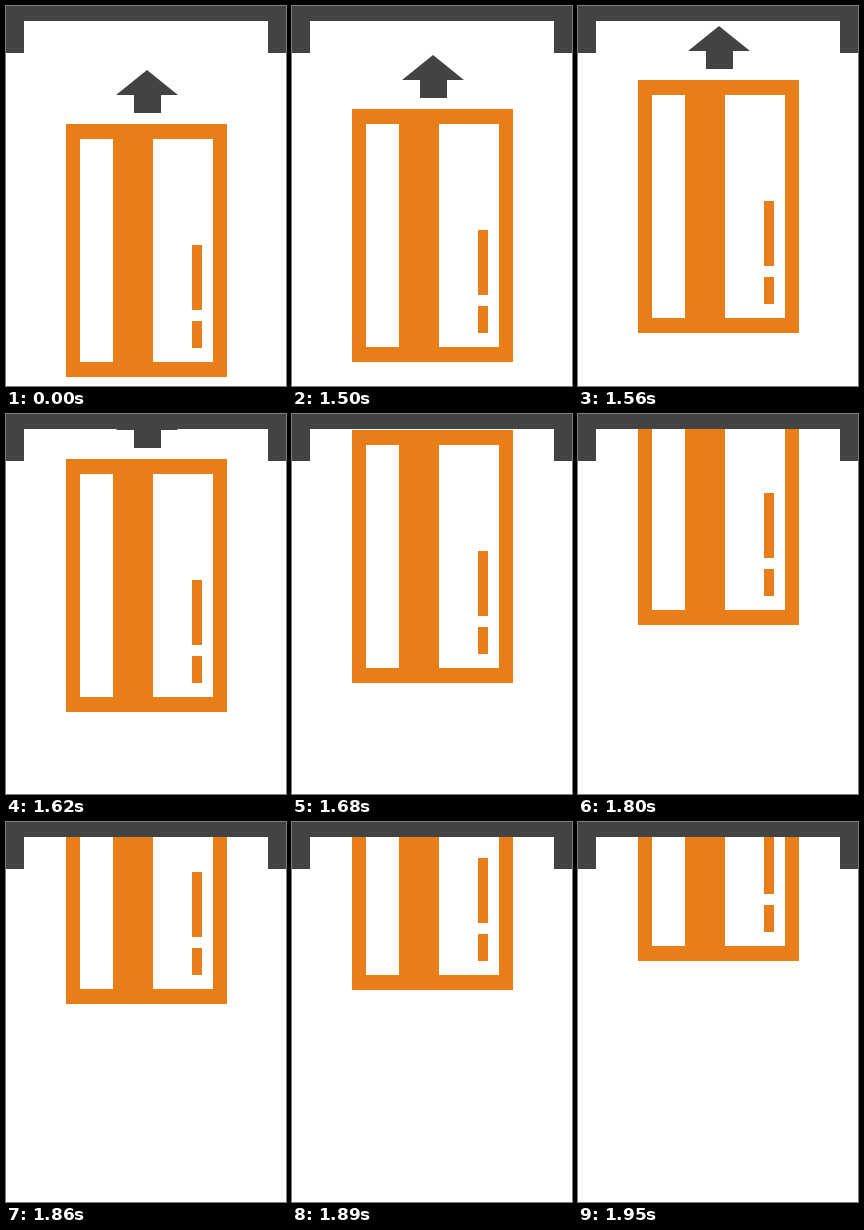
An HTML page for the animation above (3.45 s loop, 280 by 380 pixels).

```html
<!DOCTYPE html>
<html lang="en">
<head>
<meta charset="utf-8">
<title>Insert card</title>
<style>
  html, body { margin: 0; height: 100%; overflow: hidden; background: #fff; }
  svg { display: block; }
</style>
</head>
<body>
<svg width="280" height="380" viewBox="0 0 280 380">
  <g id="card">
    <path fill="#434343" d="M141 64L172 89H155V107H128V89H110Z"/>
    <path fill="#e87e1a" fill-rule="evenodd" d="M60 118H221V371H60Z M74 133V356H107V133Z M147 133V356H207V133Z
      M186 239H196V304H186Z M186 315H196V342H186Z"/>
  </g>
  <path id="slot" fill="#434343" d="M0 0H280V47H262V15H18V47H0Z"/>
</svg>
<script>
  const LOOP = 3450, START = 1500, STEP = 30, STEPS = 16, RISE = 14.5;
  const card = document.getElementById('card');

  function draw(now) {
    const t = now % LOOP;
    const step = Math.min(STEPS, Math.max(0, Math.floor((t - START) / STEP) + 1));
    card.setAttribute('transform', `translate(0 ${-Math.round(step * RISE)})`);
  }

  const start = performance.now();
  function tick(now) {
    draw(Math.max(0, now - start));
    requestAnimationFrame(tick);
  }
  draw(0);
  requestAnimationFrame(tick);
</script>
</body>
</html>
```
